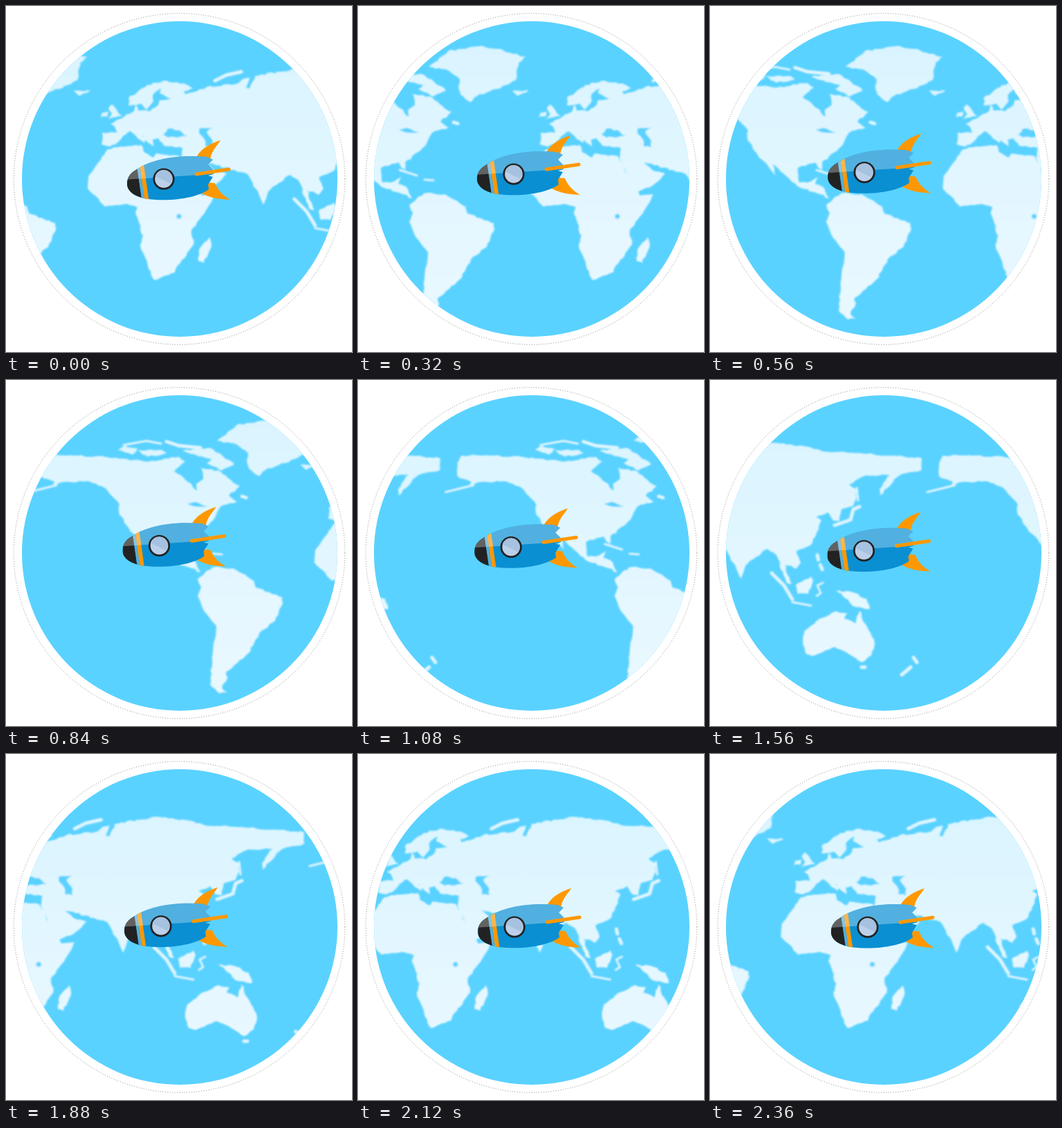
An HTML page for the animation above (2.4 s loop, 500 by 500 pixels).

```html
<!DOCTYPE html>
<html lang="en">
<head>
<meta charset="utf-8">
<title>Rocket around the world</title>
<style>
  html, body { margin: 0; height: 100%; overflow: hidden; background: #fff; }
  svg { display: block; width: 100%; height: 100%; }
  polygon { fill: url(#ice); }
  polyline { fill: none; stroke: #e0f5ff; stroke-width: 5; stroke-linecap: round; stroke-linejoin: round; }
  .thin { stroke-width: 3; }
  .sea { fill: #5ad2ff; }
  .orange { fill: #ff9800; }
</style>
</head>
<body>
<svg viewBox="0 0 500 500">
  <defs>
    <linearGradient id="ice" gradientUnits="userSpaceOnUse" x1="0" y1="60" x2="0" y2="400">
      <stop stop-color="#daf4ff"/><stop offset="1" stop-color="#e8f8ff"/>
    </linearGradient>
    <filter id="soft" filterUnits="userSpaceOnUse" x="-320" y="0" width="1000" height="500">
      <feGaussianBlur stdDeviation=".8"/>
    </filter>
    <clipPath id="globe"><circle cx="251" cy="250" r="228"/></clipPath>
    <clipPath id="hull">
      <path d="M175 257C175 247 180 241 189 236C210 221 250 214 290 218L299 222 292 229 299 236 300 243 292 245 299 247 292 258 293 265C276 277 242 283 205 279C188 276 175 269 175 257Z"/>
    </clipPath>

    <g id="world" filter="url(#soft)">
      <!-- Africa, Europe, western Asia -->
      <g>
        <polygon points="147 207 166 203 196 201 199 211 213 219 217 213 251 217 264 243 283 274 302 272 288 297 268 324 271 345 254 367 244 385 214 396 204 370 194 345 198 332 187 300 190 291 174 286 143 290 118 264 119 246 137 222"/>
        <polygon points="294 334 297 345 286 371 278 369 280 350"/>
        <polygon points="139 183 160 183 157 174 151 170 166 163 185 152 187 143 191 151 208 152 220 143 222 136 240 133 290 117 335 112 343 105 352 103 347 118 352 119 360 101 402 94 402 251 379 268 372 287 361 264 349 243 303 230 288 226 305 239 319 242 304 257 277 270 253 220 255 205 228 202 220 191 212 193 213 203 206 198 188 178 202 192 200 198 180 181 169 188 158 200 150 203 138 200"/>
        <polygon points="177 144 177 133 204 114 232 108 262 114 270 119 257 123 260 129 238 134 222 126 224 119 212 129 213 138 203 150 195 141"/>
        <polygon points="153 142 158 147 168 159 147 164 153 156 148 148"/>
        <polygon points="139 154 147 152 146 160 137 161"/>
        <polygon points="98 122 122 123 106 130"/>
        <polyline points="302 108 318 100 340 95"/>
        <polygon class="sea" points="227 186 234 177 250 179 262 188 234 190"/>
        <polygon class="sea" points="279 177 299 176 290 182 299 195 299 204 288 203 287 193 279 184"/>
        <circle class="sea" cx="250" cy="304" r="3.5"/>
      </g>

      <!-- Eastern Asia, Oceania -->
      <g transform="translate(327.6)">
        <polygon points="66 95 97 91 145 97 160 102 206 105 306 113 306 130 275 137 264 148 246 167 245 158 260 137 225 138 201 151 213 160 207 182 190 187 187 204 178 203 170 191 153 198 161 203 157 216 148 236 125 247 131 264 124 273 107 266 118 295 110 292 95 252 83 244 66 252"/>
        <polyline points="180 210 203 202 207 187 216 183"/>
        <polyline class="thin" points="212 156 214 174"/>
        <polyline points="155 253 157 262 165 280" stroke-dasharray="7 8"/>
        <polyline points="89 279 107 297 119 317"/>
        <polyline class="thin" points="119 321 146 326"/>
        <polygon points="124 296 146 284 149 290 142 309 127 309"/>
        <polyline class="thin" points="163 293 155 297 160 308 154 312"/>
        <polygon points="182 304 204 306 226 316 231 331 207 327 200 318"/>
        <polygon points="137 362 158 345 182 334 198 337 194 345 210 352 216 333 224 352 238 380 233 398 219 408 196 393 180 386 148 399 139 396 134 374"/>
        <polyline points="219 415 224 415"/>
        <polyline points="294 401 299 408"/>
        <polyline points="290 415 277 426"/>
      </g>

      <!-- Americas, Greenland -->
      <g transform="translate(-327.6)">
        <polygon points="50 120 56 109 83 109 130 110 158 112 205 118 250 111 259 118 243 132 268 150 276 160 275 150 285 143 282 127 310 132 328 148 338 153 322 167 334 176 310 183 300 202 271 226 272 240 261 226 236 234 238 255 250 255 265 247 261 257 272 261 281 278 268 272 235 260 200 228 204 245 174 210 163 190 164 180 143 156 122 147 88 147 68 152 70 147 50 139"/>
        <polyline class="thin" points="33 162 73 152"/>
        <polygon points="291 275 303 270 328 272 358 290 361 300 399 314 400 322 389 348 366 366 350 395 330 412 318 422 320 430 312 445 320 452 308 453 295 440 299 390 304 356 287 335 277 312 282 299 277 288"/>
        <polygon points="162 101 172 95 190 99 182 108"/>
        <polygon points="190 101 225 101 232 106 205 111"/>
        <polyline class="thin" points="170 94 203 88 224 92"/>
        <polyline points="232 89 250 95 281 98"/>
        <polygon points="255 102 295 98 330 122 311 131 290 120 297 114 270 107"/>
        <polyline points="341 168 347 170"/>
        <polyline class="thin" points="263 237 288 245"/>
        <polyline class="thin" points="299 251 312 252"/>
        <polygon points="305 88 333 65 378 58 403 62 445 73 435 82 431 107 403 120 375 130 366 139 351 128 348 115 350 106 333 93"/>
        <polygon class="sea" points="262 179 273 176 291 183 275 183"/>
      </g>
    </g>
  </defs>

  <circle cx="250.5" cy="250" r="239.3" fill="#fff" stroke="#555" stroke-width=".7" stroke-dasharray="1 2.5"/>
  <g clip-path="url(#globe)">
    <rect class="sea" width="500" height="500"/>
    <g id="map"><use href="#world"/><use href="#world" x="-936"/></g>
  </g>

  <g id="rocket">
    <path class="orange" d="M310 194C288 201 277 211 273 224L287 220 288 226 295 226C295 211 303 205 310 194ZM324 280C311 272 306 265 302 256L291 255C292 264 289 269 280 269C293 277 306 279 324 280Z"/>
    <g clip-path="url(#hull)">
      <path fill="#0a8fd2" d="M170 210H310V290H170Z"/>
      <path fill="#222" d="M170 230H189L197 285H170Z"/>
      <path stroke="#53aedb" stroke-width="4" d="M191 230 199 285"/>
      <path stroke="#ff9800" stroke-width="6" d="M195.500 225 204 285"/>
      <path fill="#fff" fill-opacity=".29" d="M170 251 310 242V205H170Z"/>
    </g>
    <path d="M275 243 322 236" stroke="#ff9800" stroke-width="5" stroke-linecap="round"/>
    <circle cx="228" cy="250" r="14.2" fill="#bdd0e9" stroke="#222" stroke-width="2.8"/>
    <path fill="#a6c2e0" d="M215.500 246A12.800 12.800 0 0 1 240.500 248L238 257Z"/>
  </g>
</svg>
<script>
  const LOOP = 2400, STEP = 40, MAP_WIDTH = 936;
  // Rocket drift: time, x, y
  const drift = [[0, 0, 0], [320, -3, -7], [840, -6.5, -10.5], [1280, -6.5, -6], [1560, -5.5, -3.2], [1880, -4, -1.2]];
  const map = document.getElementById('map');
  const rocket = document.getElementById('rocket');

  let seed = 7;
  function wobble() {
    seed = seed * 16807 % 2147483647;
    return (seed / 2147483647 - .5) * 2.6;
  }

  // Break long straight edges into an uneven coastline
  function roughen(shape) {
    const n = shape.points.numberOfItems, coast = [];
    for (let i = 0; i < n; i++) {
      const a = shape.points.getItem(i), b = shape.points.getItem((i + 1) % n);
      const dx = b.x - a.x, dy = b.y - a.y;
      const pieces = Math.max(1, Math.round(Math.hypot(dx, dy) / 5));
      coast.push(a.x, a.y);
      for (let k = 1; k < pieces; k++) {
        coast.push(a.x + dx * k / pieces + wobble(), a.y + dy * k / pieces + wobble());
      }
    }
    shape.setAttribute('points', coast.join(' '));
  }

  function knot(i) {
    const n = drift.length, [t, x, y] = drift[(i + n) % n];
    return [t + Math.floor(i / n) * LOOP, x, y];
  }

  // Closed cubic spline through the drift points
  function driftAt(t, axis) {
    let i = 0;
    while (knot(i + 1)[0] <= t) i++;
    const [p, a, b, q] = [-1, 0, 1, 2].map(k => knot(i + k));
    const slope = (from, to) => (to[axis] - from[axis]) / (to[0] - from[0]);
    const span = b[0] - a[0], u = (t - a[0]) / span, v = 1 - u;
    return v * v * (1 + 2 * u) * a[axis] + u * u * (1 + 2 * v) * b[axis]
      + span * u * v * (v * slope(p, b) - u * slope(a, q));
  }

  function draw(now) {
    const t = Math.floor(now % LOOP / STEP) * STEP;
    map.setAttribute('transform', `translate(${t / LOOP * MAP_WIDTH})`);
    rocket.setAttribute('transform', `translate(${driftAt(t, 1)} ${driftAt(t, 2)})`);
  }

  document.querySelectorAll('polygon').forEach(roughen);
  const start = performance.now();
  function tick() {
    draw(performance.now() - start);
    requestAnimationFrame(tick);
  }
  tick();
</script>
</body>
</html>
```
